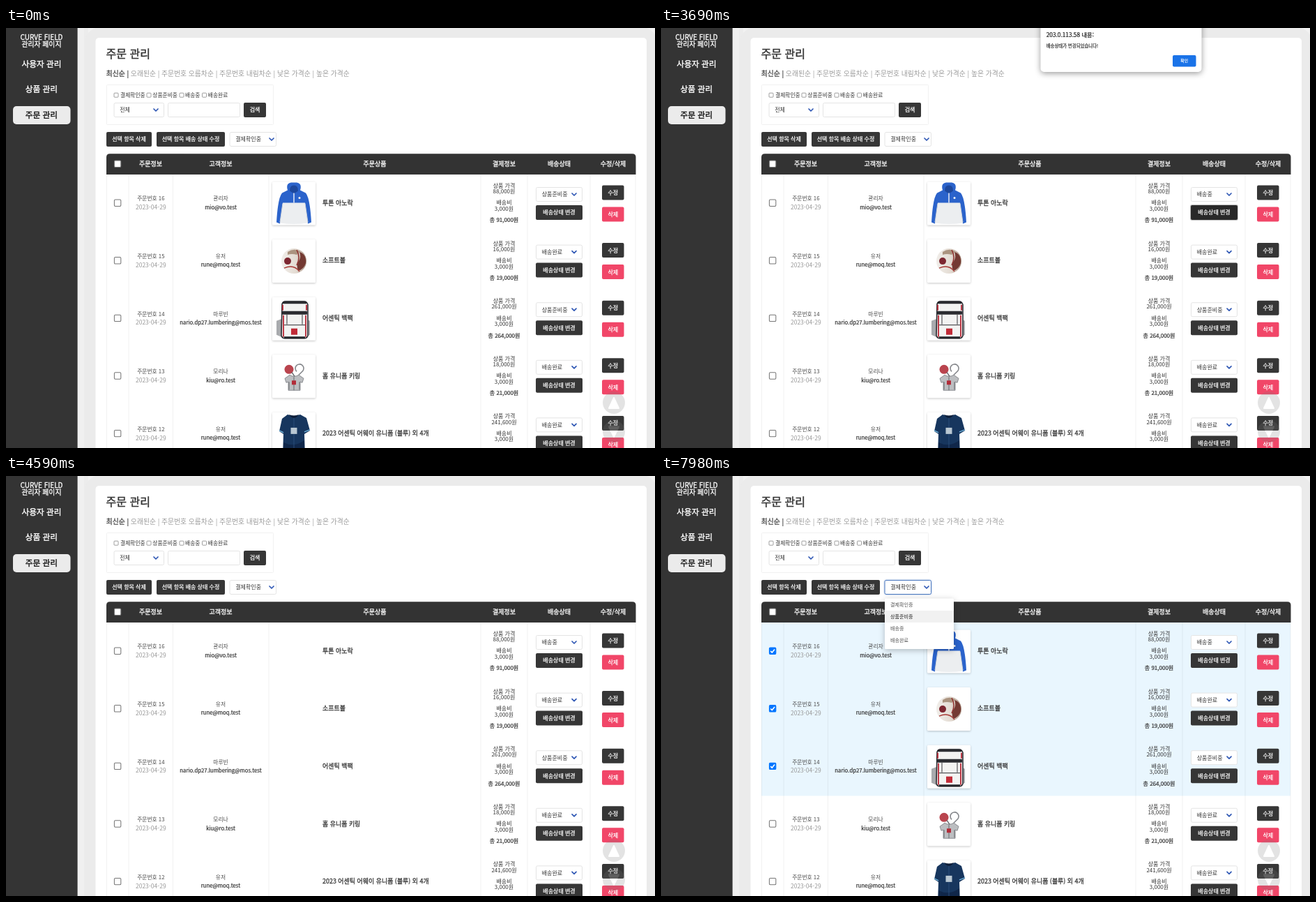
These frames come from a looping animation (931 by 602 pixels, 8 s). An HTML page:

```html
<!DOCTYPE html>
<html lang="ko">
<head>
<meta charset="utf-8">
<title>주문 관리</title>
<style>
html, body { margin: 0; height: 100%; overflow: hidden; background: #f2f2f2; }
svg { display: block; width: 100vw; height: 100vh; }
text { font-family: "Noto Sans CJK KR", "Noto Sans KR", "Noto Sans", sans-serif; white-space: pre; }
.select rect { fill: #fff; stroke: #e4e4e4; }
.select path { fill: none; stroke: #3159b5; stroke-width: 1.7; stroke-linecap: round; stroke-linejoin: round; }
.select.hover rect { stroke: #b5b5b5; }
.select.hover path { stroke: #363636; }
.select.focus rect { stroke: #4a78c0; filter: drop-shadow(0 0 1px rgba(74, 120, 192, .5)); }
.box rect { fill: #fff; stroke: #767676; }
.box path { fill: none; stroke: none; stroke-width: 1.6; }
.box.hover rect { stroke: #4f4f4f; }
.box.on rect { fill: #0075ff; stroke: #0075ff; }
.box.on path { stroke: #fff; }
.ring { stroke: rgba(54, 54, 54, .3); stroke-width: 2; }
.card { filter: drop-shadow(0 1px 1.5px rgba(0, 0, 0, .22)); }
.menu { filter: drop-shadow(0 2px 4px rgba(0, 0, 0, .25)); }
.dialog { filter: drop-shadow(0 2px 4px rgba(0, 0, 0, .4)); }
</style>
</head>
<body>
<svg id="stage" viewBox="0 0 931 602"></svg>
<script>
const DARK = '#363636', RED = '#f14668';
const STATES = ['결제확인중', '상품준비중', '배송중', '배송완료'];
const ROWS = [
  [16, '관리자', 'mio@vo.test', '투톤 아노락', 88000, 1],
  [15, '유저', 'rune@moq.test', '소프트볼', 16000, 3],
  [14, '마루빈', 'nario.dp27.lumbering@mos.test', '어센틱 백팩', 261000, 1],
  [13, '모리나', 'kiu@ro.test', '홈 유니폼 키링', 18000, 3],
  [12, '유저', 'rune@moq.test', '2023 어센틱 어웨이 유니폼 (블루) 외 4개', 241600, 3]
];
const PITCH = 82.6;

// Text is placed by the middle of its line; a thin outline gives the medium weight.
const outline = (size, color) => `stroke="${color}" stroke-width="${size * .03}"`;
const text = (x, y, size, str, fill = DARK, anchor = 'middle', medium = false) =>
  `<text x="${x}" y="${y + size * .37}" font-size="${size}" fill="${fill}" text-anchor="${anchor}" ${medium ? outline(size, fill) : ''}>${str}</text>`;
const left = (x, y, size, str, fill, medium) => text(x, y, size, str, fill, 'start', medium);
const mid = (x, y, size, str, fill) => text(x, y, size, str, fill, 'middle', true);
const rect = (x, y, w, h, fill, r = 0, more = '') =>
  `<rect x="${x}" y="${y}" width="${w}" height="${h}" rx="${r}" fill="${fill}" ${more}/>`;
const path = (d, fill, more = '') => `<path d="${d}" fill="${fill}" ${more}/>`;
const line = (d, color, w = 1) => path(d, 'none', `stroke="${color}" stroke-width="${w}"`);
const disc = (x, y, r, fill) => `<circle cx="${x}" cy="${y}" r="${r}" fill="${fill}"/>`;
const button = (x, y, w, h, label, fill = DARK, more = '') =>
  rect(x, y, w, h, fill, 2, more) + mid(x + w / 2, y + h / 2, 8, label, '#fff');
const select = (id, x, y, w, label, inset = 12) =>
  `<g id="${id}" class="select">${rect(x + .5, y + .5, w - 1, 20, '#fff', 2)}` +
  left(x + 8.7, y + 10.5, 8, label) + path(`M${x + w - inset - 3} ${y + 9}l3 3 3-3`, 'none') + '</g>';
const box = (id, x, y, s) =>
  `<g id="${id}" class="box">${rect(x + .5, y + .5, s - 1, s - 1, '#fff', s * .13, `stroke-width="${s * .1}"`)}` +
  path(`M${x + s * .22} ${y + s * .52}l${s * .2} ${s * .2} ${s * .36} ${-s * .44}`, 'none') + '</g>';

const ART = [
  // anorak
  path('M-9-19Q-12-29-4-30H4Q12-29 9-19L17-15Q23-8 25 27L20 29 15 0H-15L-20 29-25 27Q-23-8-17-15Z', '#2b63cb') +
  path('M-16-1H16L20 28Q0 31-20 28Z', '#eceef0') +
  path('M-6-18Q-6-26 0-26Q6-26 6-18L0-14Z', '#1d489d') +
  line('M0-15V-1', '#f4f6fa', 1.4) + line('M-16 0L-20 27M16 0L20 27', '#cfd4da') + disc(8, -8, 1.5, '#f4f6fa'),
  // ball
  disc(0, 0, 18, 'url(#leather)') +
  path('M8-13Q18-10 17 3Q14 12 6 14Q3 6 7 0Q11-6 8-13Z', '#743a33') +
  path('M-9-13Q0-19 9-14L4-9Q-3-11-9-9Z', '#ab9480') +
  line('M-14 10Q0 4 8 15', '#a83a36', 1.4) + line('M4-16Q10-6 4 6', '#8d2c2a', 1.4) + disc(-9, 0, 5, '#7d2731'),
  // backpack
  path('M-17 0L-25 3V23L-16 27ZM17 0L23 3V23L16 27Z', '#a9abae') +
  path('M-17-21Q-16-25-12-25H14Q19-25 20-20V24Q19 28 15 28H-13Q-17 28-18 24Z', '#f3f3f2', 'stroke="#2b2c31" stroke-width="1.6"') +
  line('M-16-23H18M-14 27H16', '#25262b', 3) + rect(-17, -11, 36, 5, '#2b2c31', 1) +
  line('M-16-20V-12M18-20V-12M-15-5V26M17-5V26', '#b72736', 1.8) +
  line('M-10-6V8M12-6V8M-14 9H16', '#55565a', 1.2) + rect(-4, 14, 9, 9, '#c12b38'),
  // key ring
  line('M4-7A6 6 0 1 1 13-8L7-2', '#85878b', 1.6) +
  path('M-6-2L-13 3-11 9-8 8V20H9V8L12 9 14 3 7-2Q0 2-6-2Z', '#bcbec1', 'stroke="#77797e" stroke-width=".8"') +
  line('M0 1V20M-7 8V19M8 8V19', '#66686d') + disc(-7, -10, 6.5, '#b9444e') +
  line('M-3-6L1 0', '#66686d', 1.5) + rect(-3, 6, 6, 6, '#b22c39'),
  // jersey
  path('M-9-28Q0-24 9-28L18-23 23-5 15 0 16 31H-16L-15 0-21-4-17-22Z', '#17365e') +
  path('M-15 12Q0 20 15 9V31H-15Z', '#10274a') + path('M-7-28Q0-18 7-28Q0-25-7-28Z', '#0d1d38') +
  line('M-21-5L-15-2M23-6L15-3', '#6fb1d8', 1.5) + line('M0-23V30', '#2b4c78') + rect(-4.5, -9, 9, 9, '#b9c7d2')
];

const row = ([no, name, mail, product, price, state], i) => {
  const c = 250.5 + PITCH * i, won = n => n.toLocaleString('en') + '원';
  return rect(144, 210 + PITCH * i, 759, PITCH + .6, '#e9f6fe', 0, `id="tint${i}" opacity="0"`) +
    box('check' + i, 154.9, c - 5, 10.4) +
    text(207.8, c - 6, 7.75, '주문번호 ' + no, '#4a4a4a') +
    text(207.8, c + 6.5, 8.5, '2023-04-29', '#999') +
    text(308, c - 6, 7.75, name, '#4a4a4a') + mid(308, c + 6.5, 7.75, mail) +
    `<g class="photo"><g class="card">${rect(382, c - 30, 62, 62, '#fff', 1.5)}</g>` +
    `<g transform="translate(413 ${c + 1})">${ART[i]}</g></g>` +
    left(454, c, 8.95, product, DARK, true) +
    text(714.5, c - 24.5, 8, '상품 가격') + text(714.5, c - 16.3, 8, won(price)) +
    text(714.5, c, 8, '배송비') + text(714.5, c + 8.5, 8, '3,000원') +
    mid(714.5, c + 25, 8, '총 ' + won(price + 3000)) +
    select('state' + i, 760, c - 22.5, 67, STATES[state]) +
    button(760, c + 3.5, 67, 21, '배송상태 변경', DARK, `id="apply${i}"`) +
    button(855, c - 25, 31.5, 21, '수정') + button(855, c + 6, 31.5, 21, '삭제', RED);
};

const filters = [[154.5, 164], [201.5, 210.3], [248.5, 257], [281, 289.8]];
const heads = [[207.5, '주문정보'], [308, '고객정보'], [529, '주문상품'], [714.5, '결제정보'], [793.5, '배송상태'], [871, '수정/삭제']];

const menu = (id, x, y, w, h, pitch, first, tx, anchor) =>
  `<g id="${id}"><g class="menu">${rect(x, y, w, h, '#fff', 1.5)}</g>` +
  rect(x, 0, w, pitch, '#f1f1f1', 0, 'class="mark"') +
  STATES.map((s, i) => text(tx, first + pitch * i, 7.1, s, '#555', anchor)).join('') + '</g>';

stage.innerHTML =
  `<defs><linearGradient id="leather"><stop stop-color="#f1eeea"/><stop offset=".6" stop-color="#e3dbd2"/><stop offset="1" stop-color="#a48a7b"/></linearGradient></defs>` +
  rect(0, 0, 931, 602, '#f2f2f2') + rect(102, 0, 16, 602, '#f0f0f0') + rect(112, 0, 6, 602, '#ececec') +
  rect(113, -1, 821, 800, '#ebebeb', 22, 'id="halo"') + rect(128.5, 14, 790.5, 800, '#fff', 5, 'id="panel"') +
  rect(0, 0, 102.6, 602, '#343434') +
  mid(51, 13, 10, 'CURVE FIELD', '#fff') + mid(51, 23.5, 9.8, '관리자 페이지', '#fff') +
  rect(10, 112, 82.5, 26, '#ebebeb', 5) +
  mid(51, 52, 11.7, '사용자 관리', '#fff') + mid(51, 88, 11.7, '상품 관리', '#fff') +
  mid(51, 124.3, 11.7, '주문 관리', '#111') +
  left(143.5, 37.5, 16, '주문 관리', DARK, true) +
  rect(144, 60.5, 760, 1, '#ededed', 0, 'id="rule"') +
  '<g id="content">' +
  left(143.7, 65, 9.8, `<tspan fill="#4a4a4a" ${outline(9.8, '#4a4a4a')}>최신순 |</tspan> 오래된순 | 주문번호 오름차순 | 주문번호 내림차순 | 낮은 가격순 | 높은 가격순`, '#999') +
  rect(144.5, 81.5, 239, 57, 'none', 1, 'stroke="#f1f1f1"') +
  filters.map(([x, tx], i) => box('filter' + i, x, 92.7, 7) + left(tx, 96.3, 7.75, STATES[i])).join('') +
  select('field', 154.5, 107, 72.5, '전체') +
  rect(232.5, 107.5, 103, 20, '#fff', 2, 'stroke="#e4e4e4"') + button(341, 107, 32, 21, '검색') +
  button(144, 149, 65, 21, '선택 항목 삭제') + button(216, 149, 98, 21, '선택 항목 배송 상태 수정') +
  select('bulk', 320.5, 149, 67.5, STATES[0], 7) +
  path('M144 210V185Q144 180.3 149 180.3H898.5Q903.5 180.3 903.5 185V210Z', '#333') + box('all', 154.9, 189.5, 10.4) +
  heads.map(([x, s]) => mid(x, 194.5, 9, s, '#fff')).join('') +
  ROWS.map(row).join('') +
  line([144.5, 176, 239.5, 377, 681, 748, 838, 903].map(x => `M${x} 210V602`).join(''), 'rgba(0,0,0,.055)') +
  menu('stateMenu', 760, 250, 65, 94, 21, 265.3, 792, 'middle') +
  menu('bulkMenu', 321, 175.5, 99, 72.5, 17, 184, 329, 'start') +
  '</g><g opacity=".2">' +
  disc(872, 537, 16, '#7a7a7a') + disc(872, 578.5, 16, '#7a7a7a') +
  ['M872 530L879 545H865Z', 'M872 586L879 571.5H865Z'].map(d =>
    path(d, '#fff', 'stroke="#fff" stroke-width="2" stroke-linejoin="round"')).join('') +
  '</g><g id="dialog"><g class="dialog">' + rect(544.5, -20, 231, 83, '#fff', 5) + '</g>' +
  left(552.7, 10, 8.3, '203.0.113.58 내용:', '#222', true) + left(552.7, 25.5, 6.4, '배송상태가 변경되었습니다!', '#333', true) +
  rect(734, 39, 33.5, 16.5, '#1a73e8', 2) + mid(750.7, 47.2, 5.8, '확인', '#fff') + '</g>';

const el = id => document.getElementById(id);
const set = (id, name, value) => el(id).setAttribute(name, value);
const show = (id, on) => { el(id).style.display = on ? '' : 'none'; };
const clamp = v => Math.max(0, Math.min(1, v));
const ease = v => v * v * (3 - 2 * v);

function openMenu(id, on, index, top, pitch) {
  show(id, on);
  el(id).querySelector('.mark').setAttribute('y', top + pitch * index);
  el(id).querySelectorAll('text').forEach((n, i) => n.setAttribute('fill', i === index ? '#222' : '#555'));
}

function draw(t) {
  const within = (a, b) => t >= a && t < b;
  const loading = within(4500, 4590);
  show('content', !loading);
  show('rule', loading);
  set('panel', 'height', loading ? 75.5 : 800);
  set('halo', 'height', loading ? 106 : 800);
  document.querySelectorAll('.photo').forEach(p => { p.style.display = within(4590, 4620) ? 'none' : ''; });

  // one order: pick a new delivery state and apply it
  el('state0').setAttribute('class', 'select' + (within(1200, 2070) ? ' hover' : within(2070, 3450) ? ' focus' : ''));
  el('state0').querySelector('text').textContent = STATES[t < 2940 ? 1 : 2];
  openMenu('stateMenu', within(2070, 2940), t < 2430 ? 1 : 2, 254.8, 21);
  const pressed = within(3450, 4200);
  set('apply0', 'class', pressed ? 'ring' : '');
  set('apply0', 'fill', pressed ? '#292929' : DARK);

  // confirmation drops in, then lifts away
  const rise = ease(clamp((t - 3450) / 240)), fall = clamp((t - 4150) / 260);
  show('dialog', within(3450, 4500));
  set('dialog', 'opacity', Math.min(rise, 1 - .94 * fall));
  set('dialog', 'transform', `translate(0 ${-10 * (1 - rise + ease(fall))})`);

  // ticking three orders
  [[5850, 5950], [6480, 6570], [6960, 7110]].forEach(([over, click], i) => {
    set('check' + i, 'class', 'box' + (t >= click ? ' on' : t >= over ? ' hover' : ''));
    set('tint' + i, 'opacity', ease(clamp((t - click) / 210)));
  });

  // changing them together
  set('bulk', 'class', 'select' + (t >= 7680 ? ' focus' : t >= 7470 ? ' hover' : ''));
  openMenu('bulkMenu', t >= 7680, t < 7950 ? 0 : 1, 176, 17);
}

const start = performance.now();
function tick() {
  draw((performance.now() - start) % 8000);
  requestAnimationFrame(tick);
}
tick();
</script>
</body>
</html>
```
